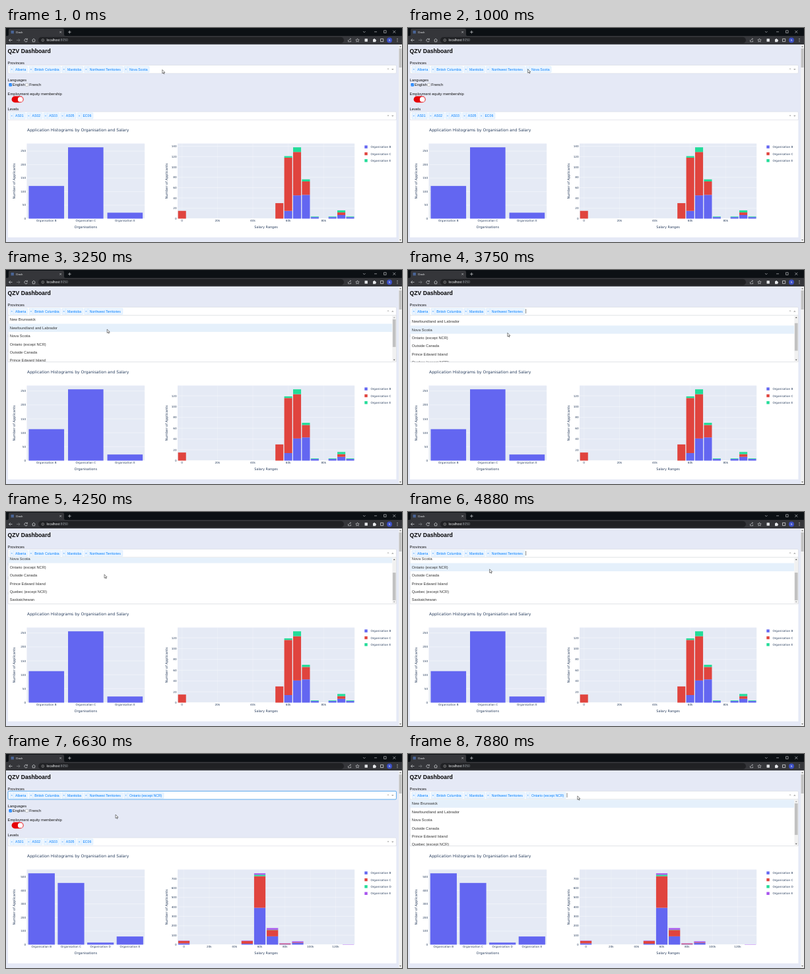
An HTML page for the animation above (8000 ms loop, 600x325 px).

```html
<!DOCTYPE html>
<html lang="en">
<head>
<meta charset="utf-8">
<title>Dashboard</title>
<style>
  html, body { margin: 0; width: 100%; height: 100%; overflow: hidden; background: #e5e9f6; }
  svg { display: block; width: 600px; height: 325px; }
  text { font-family: "Liberation Sans", Arial, sans-serif; white-space: pre; }
  .plot text { font-family: "DejaVu Sans", Verdana, sans-serif; fill: #2a3f5f; }
</style>
</head>
<body>
<svg viewBox="0 0 600 325" xmlns="http://www.w3.org/2000/svg">
  <defs><clipPath id="listClip"><rect x="3" y="69.2" width="588" height="70.2"/></clipPath></defs>
  <g id="browser"></g>
  <g id="page"></g>
  <g id="charts" class="plot"></g>
  <g id="picker"></g>
  <path id="cursor" d="M0 0V5.6L1.4 4.4L2.3 6.4L3.2 6L2.3 4.1H4.1Z" fill="#fff" stroke="#222" stroke-width=".55"/>
</svg>
<script>
const LOOP = 8000, STEP = 125;
const $ = id => document.getElementById(id);
const BLUE = '#6366f1', RED = '#e0443e', GREEN = '#22dc98', PURPLE = '#a855ee';

const rect = (x, y, w, h, fill, more = '') =>
  `<rect x="${x}" y="${y}" width="${w}" height="${h}" fill="${fill}" ${more}/>`;
const text = (x, y, size, str, fill = '#111', more = '') =>
  `<text x="${x}" y="${y}" font-size="${size}" fill="${fill}" ${more}>${str}</text>`;
const line = (d, color, w = .7, more = '') =>
  `<path d="${d}" fill="none" stroke="${color}" stroke-width="${w}" ${more}/>`;
const shape = (d, fill) => `<path d="${d}" fill="${fill}"/>`;
const cross = (x, y, r, color, w) =>
  line(`M${x - r} ${y - r}l${2 * r} ${2 * r}m0 ${-2 * r}l${-2 * r} ${2 * r}`, color, w);
const END = 'text-anchor="end"', MID = 'text-anchor="middle"';

function drawBrowser(title) {
  const c = '#d5d7da';
  $('browser').innerHTML =
    rect(0, 0, 600, 12, '#0c1014') +
    shape('M2 12Q4 12 4 10V3Q4 1 6 1H86Q88 1 88 3V10Q88 12 90 12Z', '#35363a') +
    rect(7.5, 4, 4.4, 4.4, '#4a6596') +
    text(15.3, 8.1, 4.3, title, '#e8eaed') +
    cross(82.6, 6.3, 1.3, c, .6) + line('M94 6.2h4.6m-2.3 -2.3v4.6', c) +
    line('M541 5l1.8 1.8l1.8 -1.8M558 5.8h4M586.3 3.8l4 4m0 -4l-4 4', c, .6) +
    line('M572.5 3.8h3.6v3.6h-3.6z', c, .6) +
    rect(0, 12, 600, 13, '#35363a') + rect(49, 13.8, 463, 9.4, '#202124', 'rx="4.7"') +
    line('M9.5 18.5H4.5m2.2 -2.2l-2.2 2.2l2.2 2.2', c) +
    line('M16 18.5h5m-2.2 -2.2l2.2 2.2l-2.2 2.2', '#85878b') +
    line('M32 17.2A2.3 2.3 0 1 0 32.4 19.3M32.4 15.8v1.8h-1.8', c) +
    line('M39.5 18.5l2.5 -2.3l2.5 2.3M40.3 18.2v2.7h3.4v-2.7', c) +
    '<circle cx="55.8" cy="18.5" r="1.9" fill="none" stroke="#bbb" stroke-width=".5"/>' +
    line('M55.8 18.2v1.4m0 -2.4v.5', '#bbb', .5) +
    text(61.5, 20.3, 5, 'localhost<tspan fill="#9aa0a6">:8050</tspan>', '#f1f3f4') +
    line('M518.5 18v2.8h4V19M519.8 18.6q.5 -2 2.6 -2m-1 -1.1l1.2 1.1l-1.2 1.1', c, .6) +
    line('M532.5 15.9l.8 1.8l1.9 .2l-1.4 1.3l.4 1.9l-1.7 -1l-1.7 1l.4 -1.9l-1.4 -1.3l1.9 -.2z', c, .6) +
    rect(543.5, 16.2, 4.4, 4.6, '#e3e5e8', 'rx=".6"') +
    shape('M556 17h1.2a.9 .9 0 0 1 1.8 0h1.2v1.2a.9 .9 0 0 1 0 1.8v1.2H556z', '#e3e5e8') +
    line('M567.5 16.4h4.2v4.2h-4.2z', c, .8) +
    '<circle cx="581" cy="18.5" r="4" fill="#3c4fc4"/>' + text(581, 20.1, 4.4, 'S', '#fff', MID) +
    [16.4, 18.5, 20.6].map(y => `<circle cx="593" cy="${y}" r=".6" fill="${c}"/>`).join('');
}

function tag(x, y, label, end) {
  return rect(x, y, end - x, 9.2, '#ebf5ff', 'rx=".7" stroke="#c2e0ff" stroke-width=".4"') +
    line(`M${x + 5.8} ${y}v9.2`, '#c2e0ff', .4) + cross(x + 2.9, y + 4.6, .9, '#2a90ff', .5) +
    text(x + 8.2, y + 6.5, 5.15, label, '#007eff');
}

function selectBox(y, open, focus) {
  const arrow = open ? `M584 ${y + 7.2}h3.6l-1.8 -1.9z` : `M584 ${y + 5.5}h3.6l-1.8 1.9z`;
  return (focus ? rect(2.6, y - .4, 589.4, 13.2, '#b9dbf5', 'rx="1.8"') : '') +
    rect(3.1, y, 588.3, 12.5, '#fff', `rx="1.4" stroke="${focus ? '#2a90e8' : '#c9ccd3'}" stroke-width="${focus ? .7 : .4}"`) +
    cross(579, y + 5.8, 1, '#999', .55) + shape(arrow, '#999');
}

function drawPage() {
  const label = (y, s) => text(2.6, y, 5.75, s);
  $('page').innerHTML =
    rect(0, 25, 600, 300, '#e5e9f6') +
    text(2.6, 38.1, 8.65, 'QZV Dashboard', '#000', 'font-weight="bold"') +
    label(54.5, 'Provinces') + label(81.2, 'Languages') +
    label(101.9, 'Employment equity membership') + label(125.4, 'Levels') +
    rect(4.5, 84, 4.4, 4.4, '#0075ff', 'rx=".7"') + line('M5.5 86.2l1 1l1.6 -2', '#fff') +
    text(9.9, 88, 5.75, 'English') +
    rect(29.6, 84.2, 4.1, 4.1, '#fff', 'rx=".7" stroke="#767676" stroke-width=".4"') +
    text(35.3, 88, 5.75, 'French') +
    rect(8.6, 103.6, 18, 9.6, '#e60008', 'rx="4.8"') +
    '<circle cx="21.8" cy="108.4" r="3.9" fill="#fff"/>' +
    rect(3, 140, 588.4, 178, '#fff') + selectBox(127.2, false, false) +
    ['AS01', 'AS02', 'AS03', 'AS05', 'EC06'].map((s, i) => {
      const x = 5.8 + i * 25.6;
      return tag(x, 128.8, s, x + 23.6);
    }).join('') +
    rect(595, 25, 5, 300, '#f1f1f1') + rect(595.5, 31, 4, 29, '#c1c1c1') +
    shape('M596.2 29h2.6l-1.3 -1.6z', '#555') + shape('M596.2 321.3h2.6l-1.3 1.6z', '#555');
}

// stacks: bin index, then one count per series
const tail = [[15, 3, 0, 1], [17, 3, 0, 1], [18, 7, 5, 4], [19, 3, 0, 1]];
const head = [[0, 0, 15, 0], [11, 0, 30, 0]];
const three = { names: 'BCE', colors: [BLUE, RED, GREEN], bins: 20, perTick: 4, yStep: 20, leftStep: 50 };
const DATA = [
  { ...three, counts: [121, 264, 22],
    stacks: [...head, [12, 15, 103, 3], [13, 45, 84, 9], [14, 46, 26, 4], ...tail] },
  { ...three, counts: [113, 256, 22],
    stacks: [...head, [12, 14, 102, 3], [13, 41, 82, 9], [14, 43, 23, 4], ...tail] },
  { names: 'BCDE', colors: [BLUE, RED, GREEN, PURPLE], bins: 14, perTick: 2, yStep: 100, leftStep: 100,
    counts: [526, 455, 15, 60],
    stacks: [[0, 14, 25, 0, 3], [5, 10, 28, 0, 4], [6, 390, 335, 15, 15], [7, 88, 67, 3, 17],
      [8, 4, 6, 0, 4], [9, 20, 5, 0, 10], [13, 0, 0, 0, 3]] }
];
const BASE = 289.5, TOP = 175.5;

function axes(x, w, peak, step, titleX, title) {
  const max = peak / .95, k = (BASE - TOP) / max;
  let out = rect(x, TOP, w, BASE - TOP, '#e5eaf5');
  for (let v = 0; v <= max; v += step) {
    const y = BASE - v * k;
    out += line(`M${x} ${y}h${w}`, '#fff', v ? .4 : .8) + text(x - 1.3, y + 1.5, 4.2, v, '', END);
  }
  out += text(0, 0, 5, 'Number of Applicants', '', `${MID} transform="translate(${titleX} 232.5) rotate(-90)"`) +
    text(x + w / 2, 303.6, 5, title, '', MID);
  return [k, out];
}

function drawCharts(d) {
  let out = text(32, 157.4, 6.05, 'Application Histograms by Organisation and Salary');
  const [lk, left] = axes(31.5, 178.6, Math.max(...d.counts), d.leftStep, 14.3, 'Organisations');
  out += left;
  const cw = 178.6 / d.counts.length;
  d.counts.forEach((n, i) => {
    const x = 31.5 + i * cw;
    out += rect(x + cw * .05, BASE - n * lk, cw * .9, n * lk, BLUE) +
      text(x + cw / 2, 294.4, 4.18, 'Organisation ' + d.names[i], '', MID);
  });

  const sums = d.stacks.map(s => s.slice(1).reduce((a, b) => a + b));
  const [rk, right] = axes(260, 268.2, Math.max(...sums), d.yStep, 245, 'Salary Ranges');
  out += right;
  const bw = 268.2 / d.bins;
  for (let i = 0; i < d.bins; i += d.perTick) {
    const x = 260 + (i + .5) * bw;
    out += line(`M${x} ${TOP}V${BASE}`, '#fff', .4, 'opacity=".6"') +
      text(x, 294.4, 4.2, i ? i / d.perTick * 20 + 'k' : '0', '', MID);
  }
  for (const [bin, ...parts] of d.stacks) {
    let y = BASE;
    parts.forEach((n, i) => {
      y -= n * rk;
      if (n) out += rect(260 + (bin + .05) * bw, y, bw * .9, n * rk, d.colors[i]);
    });
  }
  d.colors.forEach((c, i) => {
    const y = 180.6 + i * 10.4;
    out += rect(543.3, y - 2.2, 4.4, 4.4, c) + text(552.4, y + 1.5, 4.2, 'Organisation ' + d.names[i]);
  });
  $('charts').innerHTML = out;
}

const TAGS = [[5.8, 'Alberta', 32.6], [35, 'British Columbia', 82.8], [84.8, 'Manitoba', 116.6], [118.5, 'Northwest Territories', 176.8]];
const NOVA = [178.7, 'Nova Scotia', 217], ONTARIO = [178.7, 'Ontario (except NCR)', 239];
const OPTIONS = ['New Brunswick', 'Newfoundland and Labrador', 'Nova Scotia', 'Ontario (except NCR)',
  'Outside Canada', 'Prince Edward Island', 'Quebec (except NCR)', 'Saskatchewan'];
const ROW = 12.4, VIEW = 70.4;

function list(options, active, scroll) {
  const full = options.length * ROW, shift = scroll * (full - VIEW);
  const thumb = 59 * VIEW / full;
  let out = rect(3.1, 69, 588.3, 70.6, '#fff', 'stroke="#c9ccd3" stroke-width=".4"') + '<g clip-path="url(#listClip)">';
  options.forEach((s, i) => {
    const y = 69.2 + i * ROW - shift;
    if (i === active) out += rect(3.3, y, 582, ROW, '#e5f0fb');
    out += text(5.8, y + 8.2, 5.72, s, '#333');
  });
  return out + '</g>' + rect(585.4, 69.2, 5.6, VIEW, '#f1f1f1') +
    rect(585.9, 75 + scroll * (59 - thumb), 4.6, thumb, '#c1c1c1') +
    shape('M586.8 73h2.8l-1.4 -1.7z', scroll ? '#505050' : '#a3a3a3') +
    shape('M586.8 135.8h2.8l-1.4 1.7z', scroll === 1 ? '#a3a3a3' : '#505050');
}

function drawPicker(k, caret) {
  const first = k >= 12 && k < 41, open = first || k >= 59;
  const tags = k < 12 ? [...TAGS, NOVA] : k < 41 ? TAGS : [...TAGS, ONTARIO];
  let out = selectBox(56.4, open, k >= 41 && !open) + tags.map(([x, s, e]) => tag(x, 58.2, s, e)).join('');
  if (caret) out += rect(tags[tags.length - 1][2] + 1.7, 59.2, .55, 6.8, '#222');
  if (first) {
    const active = k < 26 ? 0 : k < 27 ? 1 : k < 35 ? 2 : k < 37 ? 4 : 3;
    out += list(OPTIONS, active, Math.min(1, Math.max(0, (k - 29) / 3)));
  } else if (open) {
    out += list(OPTIONS.filter(s => s !== ONTARIO[1]), 0, 0);
  }
  $('picker').innerHTML = out;
}

// step, x, y of the pointer tip
const PATH = [[0, 236.8, 63.4], [1, 236.2, 63], [2, 236.2, 63], [8, 181.6, 62.6], [11, 181.6, 62.6],
  [13, 183.2, 64.8], [14, 172, 71], [18, 172, 71], [25, 155, 78], [26, 153.2, 90], [27, 152, 96],
  [34, 149, 94.8], [39, 123.6, 86.8], [44, 123.6, 86.8], [51, 165, 92], [53, 166, 92], [58, 256.8, 63.8], [64, 256.8, 63.8]];

function pointer(k) {
  const i = PATH.findIndex((p, n) => k < PATH[n + 1][0]);
  const [a, b] = [PATH[i], PATH[i + 1]];
  const u = (k - a[0]) / (b[0] - a[0]), e = u * u * (3 - 2 * u);
  return [a[1] + (b[1] - a[1]) * e, a[2] + (b[2] - a[2]) * e];
}

const shown = {};
function update(key, value, draw) {
  if (shown[key] === value) return;
  shown[key] = value;
  draw(value);
}

function render(t) {
  const k = Math.floor(t / STEP), now = k * STEP;
  const busy = (k >= 14 && k < 19) || (k >= 42 && k < 45);
  const caret = k >= 12 && Math.floor((now - 1490) / 530) % 2 === 0;
  update('title', busy ? 'Updating...' : 'Dash', drawBrowser);
  update('chart', k < 19 ? 0 : k < 45 ? 1 : 2, i => drawCharts(DATA[i]));
  update('picker', k + ':' + caret, () => drawPicker(k, caret));
  update('cursor', k, () => $('cursor').setAttribute('transform', `translate(${pointer(k)})`));
}

drawPage();
const start = performance.now();
function tick() {
  render((performance.now() - start) % LOOP);
  requestAnimationFrame(tick);
}
tick();
</script>
</body>
</html>
```
